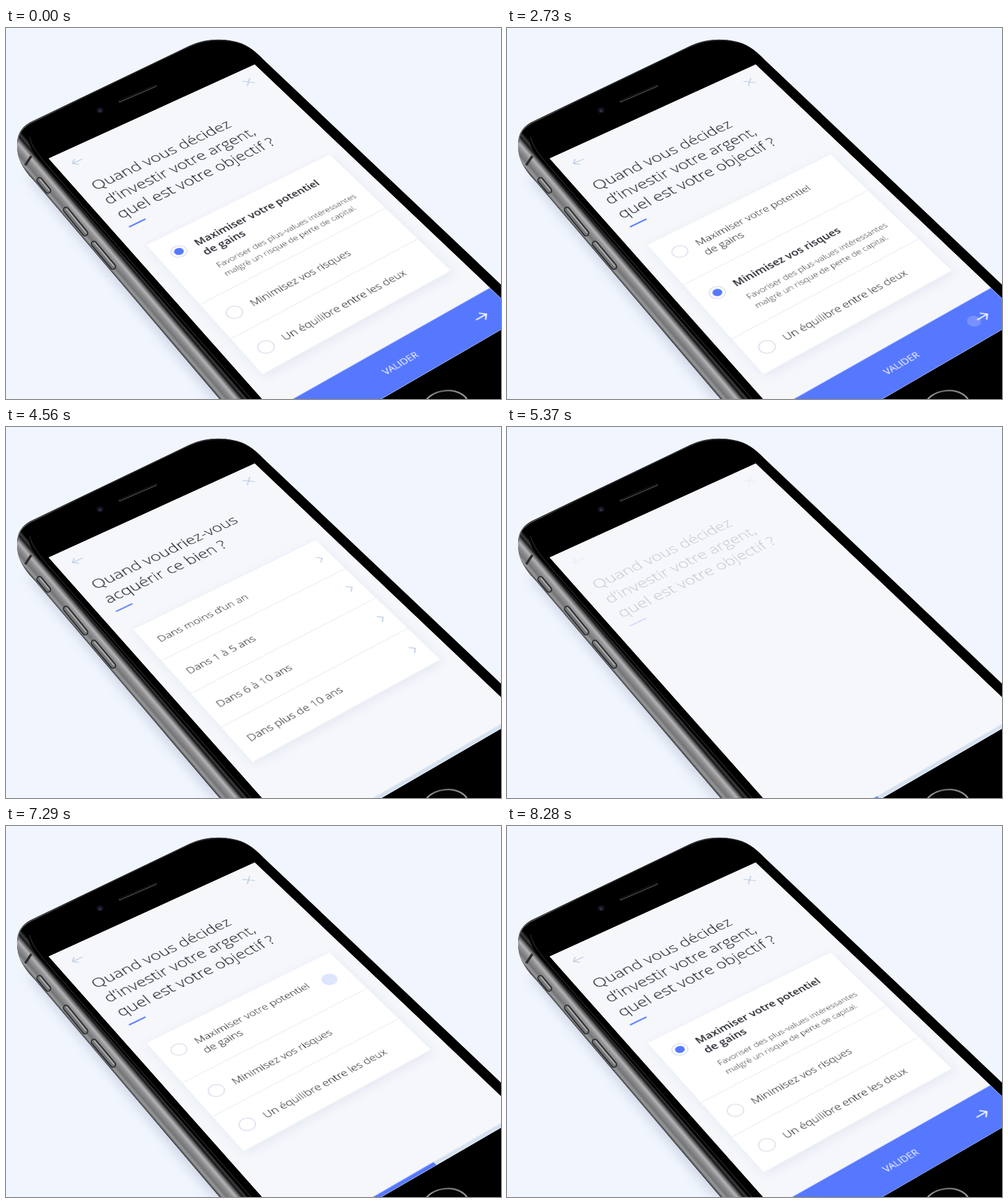
An HTML page with a canvas that plays this animation: 800x600 px, repeating every 8.31 s.

```html
<!DOCTYPE html>
<html lang="fr">
<head>
<meta charset="utf-8">
<title>Questionnaire</title>
<style>
  html, body { margin: 0; width: 100%; height: 100%; overflow: hidden; background: #f0f5fe; }
  #stage { position: relative; width: 800px; height: 600px; overflow: hidden; }
  svg { position: absolute; left: 0; top: 0; }
  #screen {
    position: absolute; left: 0; top: 0; width: 375px; height: 667px;
    transform-origin: 0 0;
    transform: matrix3d(.95496, -.39549, 0, .00016659, .51855, .55778, 0, -.00020234, 0, 0, 1, 0, 69, 211, 0, 1);
  }
</style>
</head>
<body>
<div id="stage">
  <svg width="800" height="600" viewBox="0 0 800 600">
    <defs>
      <filter id="soft" x="-20%" y="-20%" width="140%" height="140%"><feGaussianBlur stdDeviation="9"/></filter>
      <linearGradient id="metal" gradientUnits="userSpaceOnUse" x1="174" y1="398" x2="201" y2="375">
        <stop offset="0" stop-color="#4a4a4c"/>
        <stop offset=".1" stop-color="#9a9a9c"/>
        <stop offset=".24" stop-color="#747476"/>
        <stop offset=".42" stop-color="#8f8f91"/>
        <stop offset=".56" stop-color="#b4b4b6"/>
        <stop offset=".7" stop-color="#5c5c5e"/>
        <stop offset=".78" stop-color="#161617"/>
        <stop offset=".88" stop-color="#3c3c3e"/>
        <stop offset="1" stop-color="#000"/>
      </linearGradient>
      <linearGradient id="rim" gradientUnits="userSpaceOnUse" x1="30" y1="170" x2="420" y2="40">
        <stop offset="0" stop-color="#707073"/>
        <stop offset=".25" stop-color="#29292b"/>
        <stop offset=".8" stop-color="#343436"/>
        <stop offset="1" stop-color="#0a0a0a"/>
      </linearGradient>
      <linearGradient id="ring" x1="0" y1="0" x2="1" y2="0">
        <stop offset="0" stop-color="#b0b0b2"/>
        <stop offset=".45" stop-color="#69696c"/>
        <stop offset="1" stop-color="#98989b"/>
      </linearGradient>
    </defs>
    <path d="M34 240L335 600H500L120 240Z" fill="#7f8ca6" opacity=".3" filter="url(#soft)"/>
    <path d="M345 600L48 250C28 229 18 213 18 190C18 170 25 160 42 151L296 29C320 18 345 17 366 21C388 25 400 35 415 50L800 415V600Z"/>
    <path d="M345 600L48 250C28 229 18 213 18 190C18 172 25 161 40 152C32 162 34 186 44 201C52 213 64 224 76 238L390 600Z" fill="url(#metal)"/>
    <path d="M19 186C19 170 26 161 43 152L296 30C320 19 345 18 366 22C388 26 400 36 414 50" fill="none" stroke="url(#rim)" stroke-width="1.400"/>
    <path d="M396 600L70 226C51 204 41 190 38 176" fill="none" stroke="#2c2c2e" stroke-width="1.200"/>
    <path d="M31 222L41 207" stroke="#2b2b2d" stroke-width="4"/>
    <g fill="none" stroke-linecap="round">
      <path d="M54 246L68 263M97 294L128 332M142 349L173 386" stroke="#1d1d1f" stroke-width="10"/>
      <path d="M54 246L68 263M97 294L128 332M142 349L173 386" stroke="#727275" stroke-width="7"/>
      <path d="M55 245L69 262M98 293L129 331M143 348L174 385" stroke="#aaaaad" stroke-width="2"/>
    </g>
    <path d="M184 118.500L242 93.500" stroke="#626265" stroke-width="3.200" stroke-linecap="round"/>
    <path d="M184 118L242 93" stroke="#0b0b0c" stroke-width="2" stroke-linecap="round"/>
    <ellipse cx="152" cy="133" rx="5.500" ry="4.500" fill="#15151d"/>
    <circle cx="152" cy="134" r="2" fill="#30306c"/>
    <ellipse cx="711" cy="613" rx="37" ry="26.500" transform="rotate(-7 711 613)" fill="#050505" stroke="url(#ring)" stroke-width="2.600"/>
    <path d="M69 211L402 59L833.400 468.700L479.600 674Z" fill="#f5f7fb"/>
  </svg>
  <canvas id="screen"></canvas>
</div>
<script>
const LOOP = 8310, W = 375, H = 667, RES = 1.5;
const BLUE = '#5678ff', BG = '#f5f7fb', INK = '#23262f', THIN_INK = '#0c0e14', ICON = '#b5c8e2';
const LEFT = 24.5, CARD_W = 326, ROW = 77.7, EXTRA = 46, STRIP_Y = 660.5;
const TITLE_SIZE = 26.6, ROW_SIZE = 17.5;

const ASK_WHEN = ['Quand voudriez-vous', 'acquérir ce bien ?'];
const ASK_GOAL = ['Quand vous décidez', 'd’investir votre argent,', 'quel est votre objectif ?'];
const DELAYS = ['Dans moins d’un an', 'Dans 1 à 5 ans', 'Dans 6 à 10 ans', 'Dans plus de 10 ans'];
const GOALS = [['Maximiser votre potentiel', 'de gains'], ['Minimisez vos risques'], ['Un équilibre entre les deux']];
const DETAIL = ['Favoriser des plus-values intéressantes', 'malgrè un risque de perte de capital.'];

const canvas = document.getElementById('screen');
const ctx = canvas.getContext('2d');
canvas.width = Math.round(W * RES);
canvas.height = Math.round(H * RES);

const seg = (t, a, b) => Math.min(1, Math.max(0, (t - a) / (b - a)));
const easeOut = p => 1 - (1 - p) ** 2;
const easeOut3 = p => 1 - (1 - p) ** 3;
const easeInOut = p => p < .5 ? 4 * p ** 3 : 1 - (2 - 2 * p) ** 3 / 2;
const easeBack = p => 1 + 2.70158 * (p - 1) ** 3 + 1.70158 * (p - 1) ** 2;

function withAlpha(alpha, draw) {
  if (alpha <= 0) return;
  ctx.save();
  ctx.globalAlpha *= alpha;
  draw();
  ctx.restore();
}

function text(str, x, y, size, weight = 300, color = THIN_INK, align = 'left') {
  ctx.font = `${weight} ${size}px "Open Sans", sans-serif`;
  ctx.fillStyle = color;
  ctx.textAlign = align;
  ctx.fillText(str, x, y);
}

function box(x, y, w, h, color) {
  ctx.fillStyle = color;
  ctx.fillRect(x, y, w, h);
}

function lines(color, width, ...paths) {
  ctx.strokeStyle = color;
  ctx.lineWidth = width;
  ctx.beginPath();
  for (const path of paths) path.forEach(([x, y], i) => i ? ctx.lineTo(x, y) : ctx.moveTo(x, y));
  ctx.stroke();
}

function disc(x, y, r, color) {
  ctx.fillStyle = color;
  ctx.beginPath();
  ctx.arc(x, y, r, 0, 7);
  ctx.fill();
}

function header(title) {
  lines(ICON, 1.5, [[41, 30.5], [23.5, 30.5]], [[30.5, 23.5], [23.5, 30.5], [30.5, 37.5]]);
  lines(ICON, 1.5, [[336.5, 22.5], [350.5, 36.5]], [[350.5, 22.5], [336.5, 36.5]]);
  title.forEach((line, i) => text(line, 22.5, 101.2 + 36.5 * i, TITLE_SIZE));
  box(23, 83.8 + 36.5 * title.length, 28, 2.5, BLUE);
}

// rows: [{x, y, h}]
function cards(rows) {
  ctx.save();
  ctx.shadowColor = 'rgba(70,95,150,.09)';
  ctx.shadowBlur = 16 * RES;
  ctx.shadowOffsetY = 4 * RES;
  for (const r of rows) if (r.x < W) box(r.x, r.y, CARD_W, r.h, '#f1f3f8');
  ctx.restore();
  for (const r of rows) box(r.x, r.y, CARD_W, r.h - 1.5, '#fff');
}

const slide = (t, start, length) => LEFT + W * (1 - easeInOut(seg(t, start, start + length)));

function radio(x, y, fill) {
  ctx.strokeStyle = '#d3daea';
  ctx.lineWidth = 1.3;
  ctx.beginPath();
  ctx.arc(x, y, 11.4, 0, 7);
  ctx.stroke();
  if (fill > 0) disc(x, y, 7 * fill, BLUE);
}

function delayScreen(t) {
  withAlpha(seg(t, 3720, 4000), () => header(ASK_WHEN));
  const rows = DELAYS.map((_, i) => ({ x: slide(t, 3780 + 100 * i, 300), y: 204 + ROW * i, h: ROW }));
  cards(rows);
  rows.forEach(({ x, y }, i) => withAlpha(seg(t, 4080 + 80 * i, 4270 + 80 * i), () => {
    text(DELAYS[i], x + 18, y + 45, ROW_SIZE);
    lines(ICON, 1.5, [[x + 303.5, y + 31], [x + 310.5, y + 38], [x + 303.5, y + 45]]);
  }));
}

function goalState(t) {
  if (t < 3420) {
    const k = easeOut(seg(t, 1095, 1590)), dot = seg(t, 1300, 1500);
    return {
      open: [1 - k, k, 0], dot: [1 - dot, dot, 0], bold: [t < 1400, t >= 1140, false],
      detail: [1 - seg(t, 1110, 1340), seg(t, 1110, 1240), 0]
    };
  }
  return {
    open: [easeOut(seg(t, 7380, 7670)), 0, 0], dot: [seg(t, 7320, 7500), 0, 0],
    bold: [t >= 7380, false, false], detail: [seg(t, 7440, 7950), 0, 0]
  };
}

function detailText(x, y, open, alpha) {
  withAlpha(alpha, () => {
    ctx.beginPath();
    ctx.rect(x, y - 11, CARD_W, EXTRA * open);
    ctx.clip();
    DETAIL.forEach((line, i) => text(line, x + 60, y + 20.5 * i, 14, 300, INK));
  });
}

function goalScreen(t) {
  const first = t < 3420, s = goalState(t);
  withAlpha(first ? 1 : seg(t, 5310, 5610), () => header(ASK_GOAL));
  let y = 240.5;
  const rows = GOALS.map((title, i) => {
    const h = (title.length > 1 ? 96.7 : 78) + EXTRA * s.open[i];
    const row = { x: first ? LEFT : slide(t, 5610 + 200 * i, 400), y, h };
    y += h;
    return row;
  });
  cards(rows);
  rows.forEach(({ x, y }, i) => withAlpha(first ? 1 : seg(t, 6210 + 60 * i, 6450 + 60 * i), () => {
    const base = GOALS[i].length > 1 ? 44.5 : 46, last = base + 23 * (GOALS[i].length - 1);
    const [weight, ink] = s.bold[i] ? [600, INK] : [300, THIN_INK];
    radio(x + 31, y + base - 6.5, s.dot[i]);
    GOALS[i].forEach((line, n) => text(line, x + 58.5, y + base + 23 * n, ROW_SIZE, weight, ink));
    detailText(x, y + last + 31, s.open[i], s.detail[i]);
  }));
}

function strip(t) {
  const done = .3 + .295 * easeInOut(seg(t, 5270, 5600)) + .405 * easeInOut(seg(t, 7300, 7660));
  withAlpha(seg(t, 3720, 4000), () => {
    box(0, STRIP_Y, W, H - STRIP_Y, '#d6e1ef');
    if (t > 5270) box(0, STRIP_Y, W * done, H - STRIP_Y, BLUE);
  });
}

function button(rise) {
  const y = STRIP_Y - 63.3 * rise, mid = y + 35.5;
  box(0, y, W, H - y, BLUE);
  text('VALIDER', 187.5, mid + 5, 14.8, 400, '#fff', 'center');
  lines('#fff', 2, [[321, mid], [339.5, mid]], [[332, mid - 7.5], [339.5, mid], [332, mid + 7.5]]);
}

function tap(t, start, y, color = BLUE) {
  const p = seg(t, start, start + 290);
  if (p > 0 && p < 1) withAlpha(.2 * (1 - p * p), () => disc(316, y, 38 * easeOut(p), color));
}

function veil(alpha) {
  withAlpha(alpha, () => box(0, 0, W, H, BG));
}

function draw(t) {
  ctx.setTransform(RES, 0, 0, RES, 0, 0);
  box(0, 0, W, H, BG);
  if (t < 3420) {
    goalScreen(t);
    button(1);
    tap(t, 700, 426);
    tap(t, 2690, 632, '#fff');
    veil(easeOut3(seg(t, 2850, 3360)));
  } else if (t < 5250) {
    delayScreen(t);
    tap(t, 4900, 320);
    veil(seg(t, 4970, 5230));
    strip(t);
  } else {
    goalScreen(t);
    tap(t, 7240, 288);
    strip(t);
    if (t >= 8070) button(easeBack(seg(t, 8070, LOOP)));
  }
}

const begin = performance.now();
function tick() {
  draw((performance.now() - begin) % LOOP);
  requestAnimationFrame(tick);
}
tick();
</script>
</body>
</html>
```
